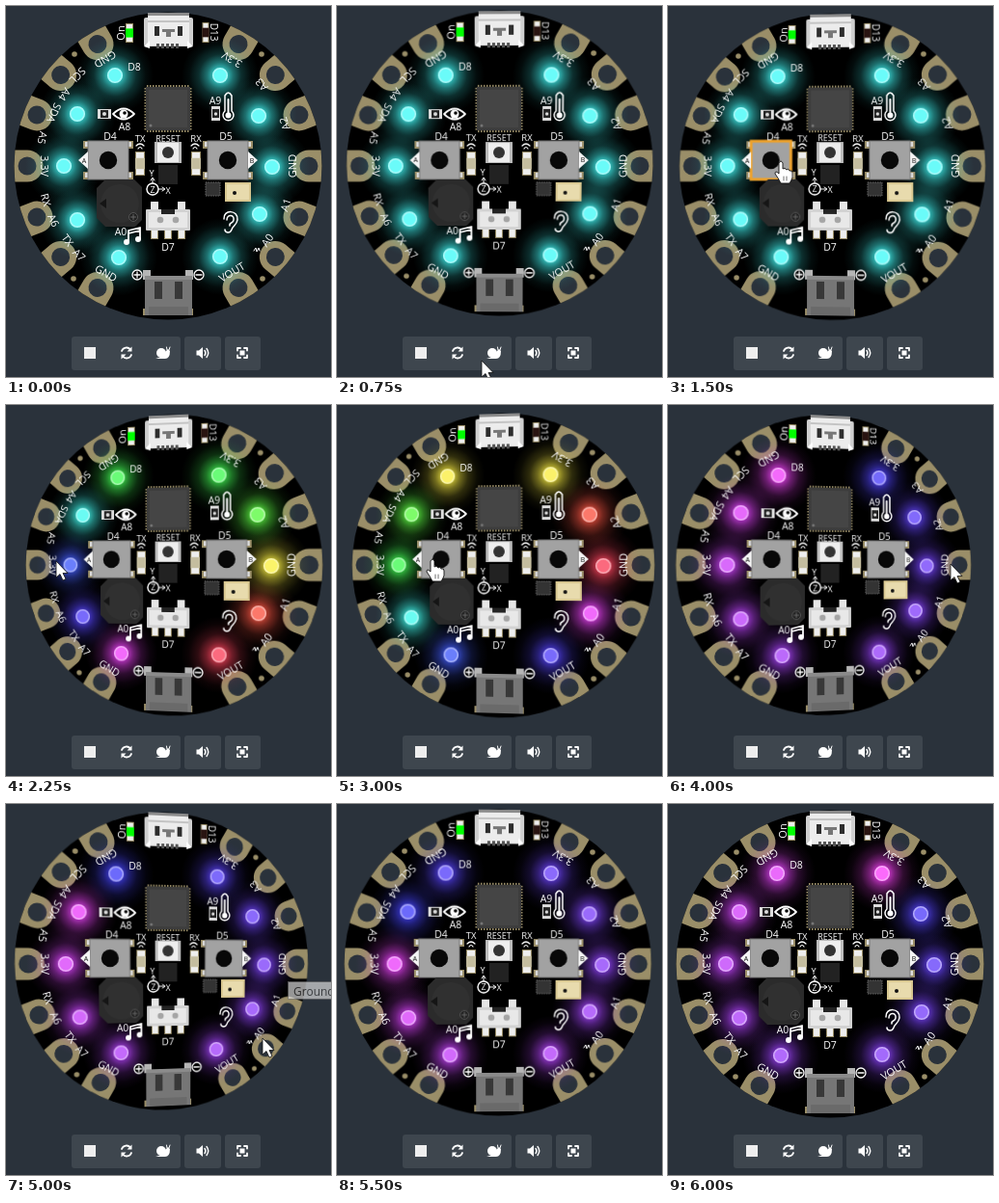
Animation of 337x385 px, one loop 6250 ms. Source, as an HTML page:

```html
<!DOCTYPE html>
<html lang="en">
<head>
<meta charset="utf-8">
<title>Board simulator</title>
<style>
html, body { margin: 0; width: 100%; height: 100%; overflow: hidden; background: #2a323b; }
svg { position: absolute; left: 0; top: 0; width: 337px; height: 385px; font-family: "Open Sans", sans-serif; }
#board { transform-origin: 168px 166px; }
text { text-anchor: middle; dominant-baseline: central; font-weight: 500; }
</style>
</head>
<body>
<svg id="board" viewBox="0 0 337 385"></svg>
<svg id="overlay" viewBox="0 0 337 385"></svg>
<script>
const CX = 168, CY = 166, R = 159.5, LOOP = 6250, STEP = 250;
const TAN = '#9a8e68', BG = '#2a323b';

const rect = (x, y, w, h, fill, extra = '') =>
  `<rect x="${x}" y="${y}" width="${w}" height="${h}" fill="${fill}" ${extra}/>`;
const circle = (x, y, r, fill, extra = '') =>
  `<circle cx="${x}" cy="${y}" r="${r}" fill="${fill}" ${extra}/>`;
const path = (d, fill = 'none', extra = '') => `<path d="${d}" fill="${fill}" ${extra}/>`;
const line = (d, width = 1.3, color = '#fff') =>
  path(d, 'none', `stroke="${color}" stroke-width="${width}" stroke-linecap="round" stroke-linejoin="round"`);
const text = (s, x, y, size = 10.5, rot = 0, fill = '#fff') =>
  `<text font-size="${size}" fill="${fill}" transform="translate(${x} ${y}) rotate(${rot})">${s}</text>`;
const times = (n, draw) => Array.from({ length: n }, (_, i) => draw(i)).join('');

// Labels read along the rim, with their tops towards the centre.
function rimLabel(s, deg, radius = 128) {
  const a = deg * Math.PI / 180;
  return text(s, CX + radius * Math.cos(a), CY + radius * Math.sin(a), 11, deg - 90);
}

function pads() {
  const half = [0, 21.3, 40.3, 60];
  const angles = half.flatMap(a => [a, 180 - a, -a, 180 + a]);
  return `<g clip-path="url(#rim)">` + [...new Set(angles)].map(a =>
    `<g transform="translate(${CX} ${CY}) rotate(${a})">` +
    path('M162 -16.500H146A16.500 16.500 0 0 0 146 16.500H162Z', TAN) + circle(146, 0, 9.5, BG) + '</g>').join('') + '</g>';
}

function pushButton(x, label, side, id) {
  const tip = x + side * 31, base = x + side * 21;
  return [-1, 1].map(s => rect(x - 26, 160 + s * 16 - 4, 52, 8, TAN) +
      rect(x - 24, 160 + s * 16 - 3, 48, 5, '#ddd')).join('') +
    rect(x - 21, 140, 42, 40, '#a2a2a2', `id="${id}" stroke="#777" stroke-width="1"`) +
    circle(x, 160, 9.2, '#080808') +
    path(`M${base} 151V169L${tip} 160Z`, '#f4f4f4') +
    text(label, base + side * 4, 160, 7, 0, '#111');
}

const smallPart = (x, y, w, h, core) =>
  rect(x, y, w, h, TAN) + rect(x + 1, y + 1, w - 2, h - 2, '#eee') +
  rect(x, y + h * .27, w, h * .46, core);

function usb() {
  return rect(143, 12, 51, 30, '#cfcfcf', 'rx="2"') + rect(147, 7, 43, 34, '#ececec') +
    rect(147, 7, 43, 3, '#8c8c8c') + rect(147, 15, 43, 2, '#c4c4c4') +
    [154, 178].map(x => rect(x, 21, 5, 10, '#2d2d2d')).join('') +
    path('M162 24H175V27H171V32H166V27H162Z', '#777') + times(5, i => rect(156 + i * 5, 39, 3, 5, '#555')) +
    path('M143 42L149 36V44ZM194 42L188 36V44Z', '#fff');
}

function processor() {
  return times(15, i => {
    const d = i * 3;
    return rect(146 + d, 82, 1.5, 49, TAN) + rect(143.5, 85 + d, 49, 1.5, TAN);
  }) + rect(145, 84, 46, 45, '#3d3d3d') + rect(148, 87, 40, 39, '#454545') + circle(150, 124, 1.5, '#777');
}

function speaker() {
  return path('M103 180H133L141 188V222L134 229H103L94 220V189Z', '#2b2b2b') +
    circle(118, 205, 20, '#303030') + path('M97 205L104 200V210Z', '#151515') +
    circle(132, 219, 4.5, '#222', 'stroke="#555"') + line('M129.5 219H134.5M132 216.5V221.5', 1, '#666');
}

function slider() {
  return [150, 164, 178].map(x => rect(x, 232, 8, 10, TAN) + rect(x + 1, 232, 6, 9, '#eee')).join('') +
    [150, 178].map(x => rect(x, 203, 8, 9, '#e6e6e6')).join('') +
    rect(145, 211, 46, 22, '#d2d2d2', 'rx="1"') + rect(148, 214, 40, 16, '#e8e8e8') +
    rect(161, 211, 14, 5, '#222') + circle(160, 222, 3.3, '#a5a5a5') + circle(176, 222, 3.3, '#a5a5a5');
}

function battery() {
  return [142, 186].map(x => rect(x, 274, 8, 10, '#b5b5b5') + rect(x, 314, 8, 7, TAN)).join('') +
    rect(144, 280, 49, 41, '#767676') + rect(144, 280, 49, 4, '#8b8b8b') +
    [154, 175].map(x => rect(x, 286, 8, 18, '#383838')).join('') + rect(148, 312, 41, 9, '#6a6a6a');
}

function icons() {
  return line('M111 112Q122 101 133 112Q122 123 111 112Z', 1.8) + circle(122, 112, 4.5, '#fff') + circle(123, 111, 1.8, '#000') +
    rect(95, 107, 14, 10, '#ddd') + rect(98, 108, 8, 8, '#222') + circle(102, 112, 2, '#ddd') +
    rect(213, 104, 9, 15, '#ddd') + rect(214, 107, 7, 9, '#222') + circle(217.5, 112, 1.7, '#ddd') +
    line('M227 109V93Q230.500 87 234 93V109A5.500 5.500 0 1 1 227 109Z', 1.5) +
    line('M230.500 97V114', 2) + circle(230.5, 113.5, 3, '#fff') +
    line('M127 244V233L139 230V241M127 236L139 233', 1.8) + circle(125, 245, 3, '#fff') + circle(137, 242, 3, '#fff') +
    line('M226 221C225 211 241 211 240 222C239 228 235 228 234 232C232 237 227 235 227 232M229 222C229 216 237 216 236 222C236 226 231 224 232 228', 1.5) +
    [[139, 148], [196, 148]].map(([x, y]) => line(`M${x - 4} ${y - 3}Q${x} ${y - 7} ${x + 4} ${y - 3}M${x - 2} ${y}Q${x} ${y - 3} ${x + 2} ${y}`, 1.2)).join('') +
    line('M152 196V179M150 181L152 178L154 181M146 190H164M162 188L165 190L162 192', 1) +
    circle(152, 190, 6, '#000', 'stroke="#fff" stroke-width="1.4"') + text('Z', 152, 190, 9) +
    text('Y', 151, 173, 9) + text('X', 168, 191, 9) +
    [136, 200].map(x => circle(x, 279, 5, '#000', 'stroke="#fff" stroke-width="1.3"') +
      line(`M${x - 3} 279H${x + 3}` + (x < 168 ? `M${x} 276V282` : ''))).join('') +
    line('M257 254L259 251L260 255L262 251L263 254', 1);
}

const leds = [[113, 72], [74, 112], [60, 166], [74, 222], [117, 261],
              [222, 260], [263, 216], [276, 167], [262, 114], [222, 72]];

const glowStops = [[0, .8], [.2, .75], [.34, .48], [.55, .2], [.8, .05], [1, 0]]
  .map(([at, alpha]) => `<stop offset="${at}" stop-color="currentColor" stop-opacity="${alpha}"/>`).join('');
const led = i => `<g class="led"><radialGradient id="glow${i}">${glowStops}</radialGradient>` +
  circle(...leds[i], 40, `url(#glow${i})`) + circle(...leds[i], 7.3, '', 'stroke-width="1.6"') + '</g>';

const captions = [
  ['D8', 133, 63], ['A8', 123, 125], ['A9', 217, 98], ['D4', 108, 135], ['TX', 139, 137, 9.5],
  ['RESET', 168, 137, 9], ['RX', 197, 137, 9.5], ['D5', 228, 135], ['A0', 119, 234],
  ['D7', 168, 250], ['On', 118, 28, 11, -90], ['D13', 216, 27, 10, 90]];
const rim = [
  ['GND', 239.5], ['SCL', 225, 132], ['A4', 214.7, 130], ['SDA', 205, 130], ['A5', 192.6, 133],
  ['3.3V', 180], ['RX', 164.5, 131], ['A6', 154.6, 131], ['TX', 143.5, 129], ['A7', 135, 130],
  ['GND', 120], ['VOUT', 59], ['A0', 36.8], ['A1', 18.3], ['GND', 0], ['A2', -20], ['A3', -41], ['3.3V', -59]];

const board = document.getElementById('board'), overlay = document.getElementById('overlay');
board.innerHTML =
  `<defs><clipPath id="rim">${circle(CX, CY, R, '#000')}</clipPath></defs>` +
  circle(CX, CY, R, '#000') + pads() +
  [[71, 50], [265, 50], [70, 283], [266, 283]].map(([x, y]) => circle(x, y, 2.8, TAN)).join('') +
  times(10, led) +
  usb() + smallPart(124, 18, 8, 20, '#0f0') + smallPart(203.5, 17, 7, 21, '#2a1512') +
  processor() + pushButton(106, 'A', -1, 'buttonA') + pushButton(230, 'B', 1, 'buttonB') +
  smallPart(134, 151, 10, 25, '#c4bd9f') + smallPart(192, 151, 10, 25, '#c4bd9f') +
  rect(154, 141, 28, 22, '#bbb') + rect(157, 142, 22, 20, '#eee') + circle(168, 152, 6, '#333') +
  rect(158, 165, 20, 20, '#222') + speaker() + slider() + battery() +
  rect(207, 183, 15, 14, '#333', 'stroke="#666" stroke-dasharray="1.500 1"') +
  rect(227, 183, 27, 20, '#d8c790') + rect(229, 185, 23, 16, '#e8dbad') + circle(237, 194, 2, '#111') +
  icons() + captions.map(c => text(...c)).join('') + rim.map(l => rimLabel(...l)).join('');

const toolbar =
  [[68, 113], [185, 38], [227, 37]].map(([x, w]) => rect(x, 343, w, 35, '#3e464e', 'rx="3"')).join('') +
  rect(81, 354, 12, 12, '#eee') +
  line('M120 358A5.200 5.200 0 0 1 129 356.500M130 362A5.200 5.200 0 0 1 121 363.500', 1.8) +
  path('M130.500 353.500V358.500H125.500ZM119.500 366.500V361.500H124.500Z', '#fff') +
  circle(161, 360, 5, '#fff') + path('M155 366Q164 364 165 359L168 356L170 358Q170 366 165 366Z', '#fff') +
  line('M167 357L166.500 354M169 357L170 354', 1) +
  path('M197.500 357.500H200L204 354V366L200 362.500H197.500Z', '#fff') +
  line('M206 357.500Q208 360 206 362.500M208 355.500Q211.500 360 208 364.500', 1.4) +
  line('M240 357.500V355H243M247 355H250V357.500M250 362.500V365H247M243 365H240V362.500', 1.8) + rect(242.5, 357.5, 5, 5, '#fff');

const arrow = path('M0 0V17L4 13.500L7 20L10 18.500L7 12.500H12Z', '#fff', 'stroke="#111" stroke-width=".8"');
const hand = path('M-2 2Q0 -2 2 2V8Q4 6 6 9Q8 7 9 10Q12 9 12 12V17Q11 20 9 23H0Q-3 17 -6 13Q-6 9 -2 13Z',
  '#fff', 'stroke="#111" stroke-width=".9"') + line('M3 16V20M6 16V20', .7, '#333');
overlay.innerHTML = toolbar +
  `<g id="tip">${rect(292.5, 184.5, 60, 18, '#e9e9e9', 'stroke="#777"')}
  <text x="298" y="194" font-size="12" fill="#444" style="text-anchor:start">Ground</text></g>` +
  `<g id="arrow">${arrow}</g><g id="hand">${hand}</g>`;

// start ms, pointer x, pointer y, tilt across and down (thousandths), pointing hand
const poses = [
  [0, null, 0, 0, 0], [750, 150, 368, 5, -18], [1000, 125, 240, 14, -14], [1250, 116, 172, 16, 2],
  [1500, 117, 161, 16, 6, 1], [1750, 62, 162, 39, 2], [2000, 52, 162, 42, 1],
  [3000, 99, 160, 29, 3, 1], [3250, 112, 161, 18, 3, 1], [3500, 185, 162, -6, 2], [3750, 275, 164, -41, 1],
  [4000, 293, 165, -45, 1], [5000, 266, 243, -46, -19], [5250, 225, 372, -18, -22],
  [5500, null, 0, -8, -10], [5750, null, 0, -2, -3], [6000, null, 0, 0, 0]];

const mod = (a, n) => ((a % n) + n) % n;

// Steady cyan, then a spinning rainbow, then a comet that speeds up with each step.
function ledHue(i, t) {
  if (t < 2000) return 179;
  if (t < 4000) {
    const hue = 138 + 40 * i + (t - 2250) * .373;
    return hue - 15 * Math.sin(3 * hue * Math.PI / 180);
  }
  const s = (t - 5000) / 1000, n = Math.round(23 + 18 * s - s * s);
  return 300 - 60 * mod(25 * i + n * (n - 1), 255) / 255;
}

const ledParts = [...board.querySelectorAll('.led')].map(g => g.children);
const get = id => document.getElementById(id);

function render(ms) {
  const t = Math.floor(ms % LOOP / STEP) * STEP;
  const [, x, y, across, down, pointing] = poses.filter(p => p[0] <= t).pop();
  const p = across / 1000, q = down / 1000;
  const sx = 1 - 21 * p * p - 12 * q * q, sy = 1 - 12 * p * p - 21 * q * q;
  board.style.transform = `matrix3d(${[sx, 0, 0, (-p / R).toFixed(9), 0, sy, 0, (-q / R).toFixed(9), 0, 0, 1, 0, 0, 0, 0, 1]})`;

  ledParts.forEach(([gradient, , core], i) => {
    const hue = ledHue(i, t);
    gradient.style.color = `hsl(${hue},80%,58%)`;
    core.setAttribute('fill', `hsl(${hue},95%,70%)`);
    core.setAttribute('stroke', `hsl(${hue},90%,82%)`);
  });

  const pressed = t === 1500 || t === 3250;
  get('buttonA').setAttribute('stroke', pressed ? '#eda22c' : '#777');
  get('buttonA').setAttribute('stroke-width', pressed ? 3 : 1);
  get('tip').style.opacity = t < 4500 || t > 5000 ? 0 : t < 5000 ? 1 : .65;
  for (const id of ['arrow', 'hand']) {
    const shown = x !== null && (id === 'hand') === !!pointing;
    get(id).style.display = shown ? '' : 'none';
    if (shown) get(id).setAttribute('transform', `translate(${x} ${y})`);
  }
}

const start = performance.now();
function tick() {
  render(performance.now() - start);
  requestAnimationFrame(tick);
}
tick();
</script>
</body>
</html>
```
